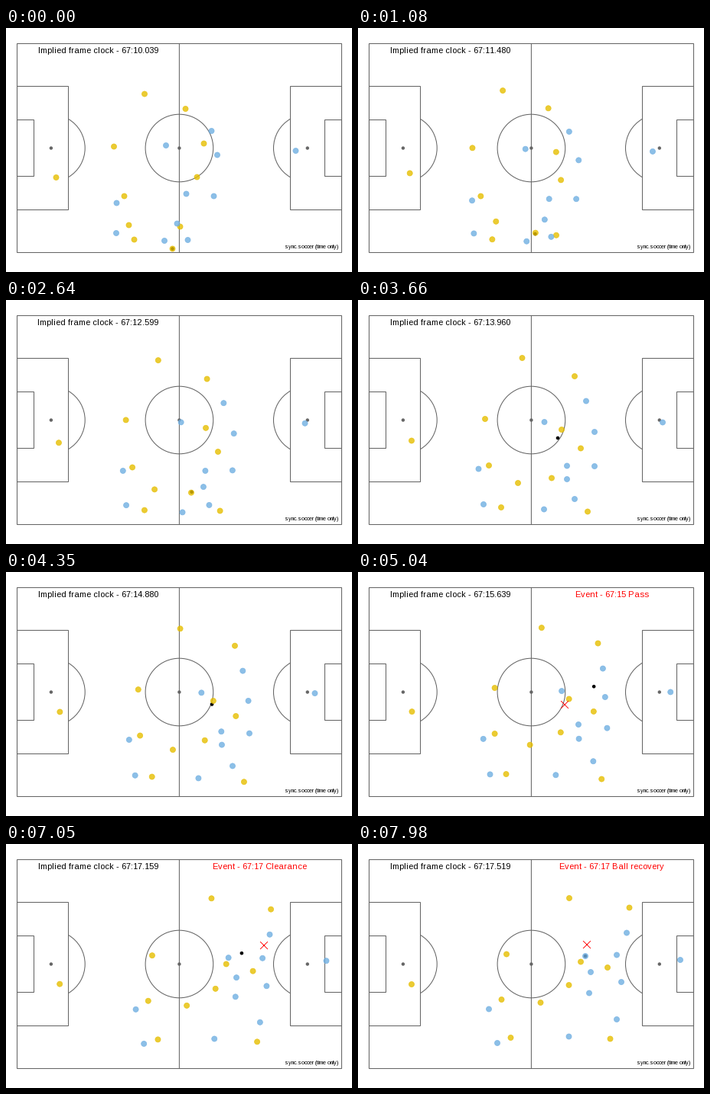
A matplotlib script for the animation above (8 s loop, 452 px wide and 320 px high).

```python
import numpy as np
import matplotlib.pyplot as plt
from matplotlib.animation import FuncAnimation
from matplotlib.patches import Arc, Circle, Rectangle

W, H, DPI = 452, 320, 64
STEP, TICK, LOOP = 30, 20, 8000
GREY, GOLD, BLUE = "#666666", "#e6be00", "#70afe2"
LEFT, RIGHT, TOP, BOTTOM = 14.5, 438.5, 20.5, 294.5
MID_X, MID_Y = 226.4, 157.5
SPOT, RADIUS = 44.4, 44.3
HOLD = 24               # extra steps the play stands still at an event
T_MID, T_END = 98, 187  # moments of play for the second and third positions

# every player runs a parabola through three positions: x, y, x, y, x, y
GOLD_RUNS = [
    (65.5, 196, 70, 184.5, 70, 184),
    (181, 86.5, 214.5, 76, 276, 71),
    (234.5, 106, 283, 100, 354.5, 83.5),
    (141, 155.5, 166, 156, 194, 144.5),
    (258.5, 151.5, 266, 170, 291, 154.5),
    (249.5, 195.5, 291, 194.5, 326, 162),
    (217.5, 289.5, 253, 233.5, 275.5, 185),
    (227.5, 260.5, 300, 277.5, 329.5, 255.5),
    (154.5, 220.5, 171, 217, 187.5, 204),
    (160.5, 258.5, 209, 240, 238.5, 208),
    (167.5, 277.5, 187, 272, 199.5, 254),
]
BLUE_RUNS = [
    (378.5, 161, 398, 160.5, 421, 152),
    (209, 154, 243.5, 160, 297, 147),
    (268.5, 135, 298, 132.5, 351, 116.5),
    (276, 166.5, 309, 173, 338, 145.5),
    (271.5, 220.5, 309, 218, 344, 181),
    (235.5, 217.5, 273, 217.5, 304, 168),
    (144.5, 229.5, 157.5, 221.5, 171, 216.5),
    (144, 269, 164, 268, 182, 261),
    (207, 279, 243, 274.5, 275.5, 252.5),
    (223.5, 256.5, 273, 235, 302, 195.5),
    (237.5, 278, 283, 261, 338, 230),
]

# moment, x, y of each touch; the ball runs straight between them
TOUCHES = np.array([(0, 217.5, 289.5), (62, 241.5, 256), (98, 261, 181),
                    (121, 269, 173.5), (154, 337, 133), (187, 297, 147)])

# step at which play stops, label, marker position
EVENTS = [
    (56, "67:12 Pass", (240, 262)),
    (164, "67:15 Pass", (270, 174)),
    (226, "67:17 Clearance", (337, 133)),
    (259, "67:17 Ball recovery", (299, 132)),
]

# whole-pixel letter spacing, free placement of shapes
plt.rcParams.update({"font.family": "Liberation Sans",
                     "text.hinting_factor": 1, "path.snap": False})


def px(n):
    return n * 72 / DPI


fig = plt.figure(figsize=(W / DPI, H / DPI), dpi=DPI, facecolor="white")
ax = fig.add_axes([0, 0, 1, 1])
ax.set_xlim(0, W)
ax.set_ylim(H, 0)
ax.axis("off")


def box(x0, x1, height):
    ax.add_patch(Rectangle((x0, MID_Y - height / 2), x1 - x0, height,
                           fill=False, ec=GREY, lw=px(1.05)))


def arc(x, turn=0, half=180):
    ax.add_patch(Arc((x, MID_Y), 2 * RADIUS, 2 * RADIUS, angle=turn,
                     theta1=-half, theta2=half, ec=GREY, lw=px(1.05)))
    dot(GREY, 2.2, (x, MID_Y), lw=0)


def dot(color, radius, pos=(0, 0), **kw):
    return ax.add_patch(Circle(pos, radius, color=color, **kw))


def draw_pitch():
    box(LEFT, RIGHT, BOTTOM - TOP)
    for depth, height in ((67, 162), (22, 74)):
        box(LEFT, LEFT + depth, height)
        box(RIGHT - depth, RIGHT, height)
    ax.plot([MID_X, MID_X], [TOP, BOTTOM], color=GREY, lw=px(1.05))
    arc(MID_X)
    arc(LEFT + SPOT, 0, 59.5)
    arc(RIGHT - SPOT - 0.3, 180, 59.5)
    ax.text(433.7, 289, "sync.soccer (time only)", ha="right", size=px(7.2))


class Team:
    def __init__(self, color, runs):
        a, b, c = np.array(runs, float).reshape(-1, 3, 2).swapaxes(0, 1)
        self.start, self.pace = a, (b - a) / T_MID
        self.bend = ((c - b) / (T_END - T_MID) - self.pace) / T_END
        self.dots = [dot(color, 3.55, alpha=0.8, lw=px(0.7), zorder=5) for _ in a]

    def move(self, m):
        places = self.start + self.pace * m + self.bend * m * (m - T_MID)
        for d, p in zip(self.dots, places):
            d.center = p


draw_pitch()
ball = dot("black", 2.3, lw=0, zorder=4)
teams = [Team(GOLD, GOLD_RUNS), Team(BLUE, BLUE_RUNS)]
cross = ax.plot([], [], color="red", lw=px(0.9), zorder=6)[0]
clock = ax.text(120, 33, "", ha="center", size=px(11))
note = ax.text(331.8, 33, "", ha="center", size=px(11), color="red")


def clock_text(m):
    t = round(4030.04 + 0.04 * m, 2)
    minute, sec = divmod(int(t), 60)
    return f"Implied frame clock - {minute}:{sec:02d}.{int(t % 1 * 1000):03d}"


def show_event(step):
    note.set_text("")
    cross.set_data([], [])
    for start, label, (x, y) in EVENTS:
        if start <= step <= start + HOLD:
            note.set_text("Event - " + label)
            arm = np.array([-4.6, 4.6, np.nan, -4.6, 4.6])
            cross.set_data(x + arm, y + arm * [1, 1, 1, -1, -1])


def update(i):
    step = (i * TICK + TICK // 2) // STEP
    m = step - sum(min(max(step - e[0], 0), HOLD) for e in EVENTS)
    t, x, y = TOUCHES.T
    ball.center = np.interp(m, t, x), np.interp(m, t, y)
    for team in teams:
        team.move(m)
    clock.set_text(clock_text(m))
    show_event(step)
    return [ball, cross, clock, note] + teams[0].dots + teams[1].dots


anim = FuncAnimation(fig, update, frames=LOOP // TICK, interval=TICK,
                     repeat=True, repeat_delay=0, blit=False)
plt.show()
```
